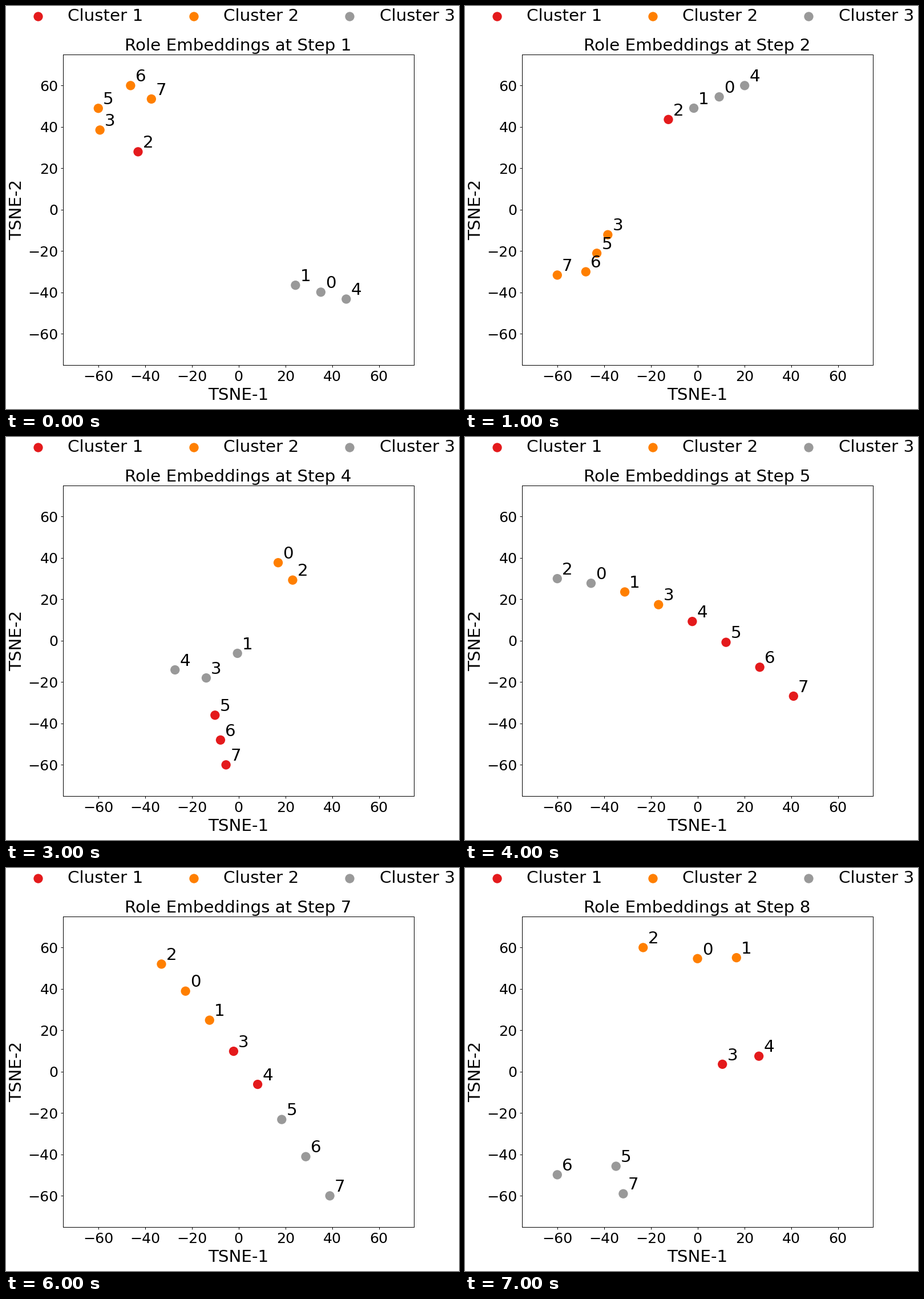
Recreate the animation shown at these times as a matplotlib script. Size 794x706 px, loop 8000 ms.

```python
import matplotlib.pyplot as plt
import numpy as np
from matplotlib.animation import FuncAnimation

W, H, DPI = 794, 706, 64
PT = 72 / DPI  # points per pixel
LEFT, RIGHT, TOP, BOTTOM = 100.3, 715.2, 85, 628.7
BIG, SMALL, DOT = 29.4 * PT, 25.2 * PT, 16.3 * PT
COLORS = ["#e41a1c", "#ff7f00", "#999999"]

# Members of the red, orange and grey cluster, and the curves the roles lie on.
# A curve is its start, end and optional bend as complex points x + yj;
# its roles are spread evenly along it.
STEPS = [
    ("2 3567 014", {"104": (24.3-36.5j, 46-43.2j), "35": (-59.3+38.5j, -60+49j),
                    "67": (-46.2+60j, -37.3+53.5j), "2": (-43+28j,)}),
    ("2 3567 014", {"2104": (-12.5+43.6j, 20.1+60j),
                    "356": (-38.4-12.1j, -47.8-30j), "7": (-60-31.6j,)}),
    ("012 67 345", {"210": (30.1-59.7j, 31.5-37.7j), "435": (33.2-10.4j, 34.6+12j),
                    "67": (36+32j, 36.6+41.6j)}),
    ("567 02 134", {"02": (16.9+37.7j, 23.1+29.3j), "567": (-10.1-36j, -5.4-60j),
                    "431": (-27.2-14.1j, -0.5-6.1j, -7.9j)}),
    ("4567 13 02", {"20134567": (-60+30j, 41-26.8j, 12j)}),
    ("4567 13 02", {"02": (-34.8+47.1j, -31.5+60j), "13": (8.2+45.7j, 16.2+35.3j),
                    "567": (34-8.7j, 60-10.9j, 1j), "4": (25-25.8j,)}),
    ("34 012 567", {"20134567": (-33+52j, 39-60j, 6j)}),
    ("34 012 567", {"201": (-23.3+60j, 16.6+55.1j, 3.3-2.9j),
                    "34": (10.6+3.6j, 26.2+7.5j),
                    "657": (-60-49.8j, -31.8-59j, 11+8.7j)}),
]


def curve(count, start, end=0, bend=0):
    t = np.linspace(0, 1, count)
    return start + (end - start) * t + bend * 4 * t * (1 - t)


def place(curves):
    """Return the position of every role as an 8 x 2 array."""
    z = np.zeros(8, complex)
    for roles, ends in curves.items():
        z[[int(r) for r in roles]] = curve(len(roles), *ends)
    return np.column_stack([z.real, z.imag])


plt.rcParams["font.family"] = "DejaVu Sans"
fig = plt.figure(figsize=(W / DPI, H / DPI), dpi=DPI, facecolor="white")
ax = fig.add_axes([LEFT / W, 1 - BOTTOM / H, (RIGHT - LEFT) / W, (BOTTOM - TOP) / H])
ticks = range(-60, 61, 20)
ax.set(xlim=(-75, 75), ylim=(-75, 75), xticks=ticks, yticks=ticks)
ax.tick_params(labelsize=SMALL, length=4.3 * PT, width=PT, pad=4.6 * PT)
for spine in ax.spines.values():
    spine.set_linewidth(PT)


def label(x, y, text, **kw):
    """Place text with its baseline at stage pixel (x, y)."""
    return fig.text(x / W, 1 - y / H, text, fontsize=BIG, va="baseline", **kw)


title = label(407, 78, "", ha="center")
label(407.5, 690, "TSNE-1", ha="center")
label(27, 357, "TSNE-2", ha="center", rotation=90, rotation_mode="anchor")

for i, color in enumerate(COLORS):
    x = 55.8 + 273.3 * i
    fig.add_artist(plt.Line2D([x / W], [1 - 17.6 / H], marker="o", ms=DOT,
                              mew=0, color=color))
    label(x + 52.2, 26, f"Cluster {i + 1}")

dots = ax.scatter([0] * 8, [0] * 8, s=DOT ** 2, linewidths=0, zorder=2)
names = [ax.text(0, 0, str(i), fontsize=BIG) for i in range(8)]


def draw(n):
    clusters, curves = STEPS[n]
    points = place(curves)
    groups = clusters.split()
    dots.set_offsets(points)
    dots.set_facecolor([color for i in range(8)
                        for color, group in zip(COLORS, groups) if str(i) in group])
    for name, point in zip(names, points):
        name.set_position(point + 2)
    title.set_text(f"Role Embeddings at Step {n + 1}")
    return [dots, title, *names]


anim = FuncAnimation(fig, draw, frames=len(STEPS), interval=1000,
                     repeat=True, repeat_delay=0)
plt.show()
```
